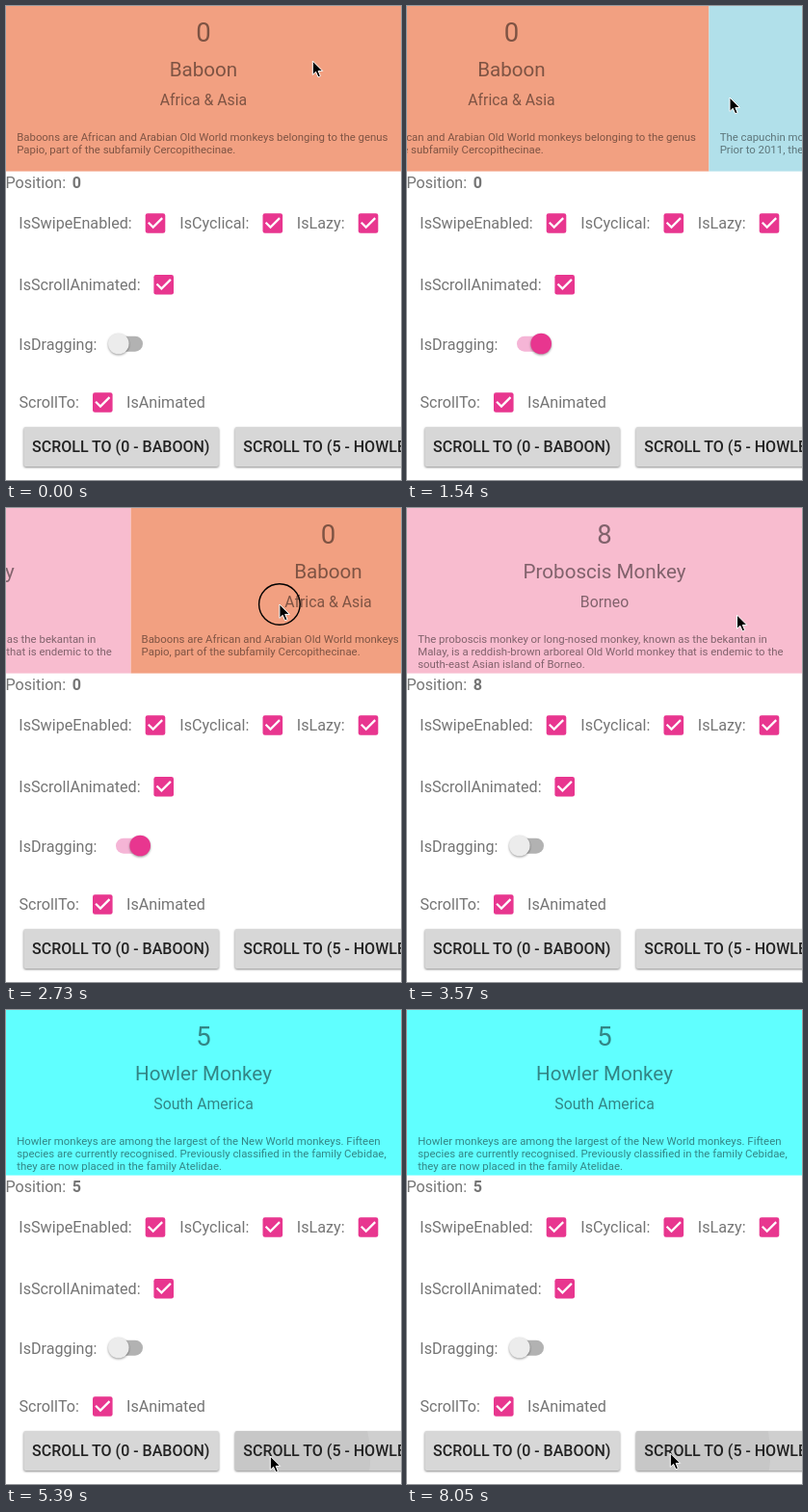
An HTML page that plays this animation: 410x492 px, repeating every 8.19 s.

```html
<!DOCTYPE html>
<html lang="en">
<head>
<meta charset="utf-8">
<title>Carousel demo</title>
<style>
  html, body { margin: 0; width: 100%; height: 100%; overflow: hidden; background: #fff; }
  svg { display: block; font: 16.15px Roboto, sans-serif; fill: #757575; }
  .card text { fill: #000; fill-opacity: .48; }
  .mid { text-anchor: middle; }
  .button text { font-size: 16px; font-weight: 500; fill: #222; }
</style>
</head>
<body>
<svg id="stage" width="410" height="492" viewBox="0 0 410 492"></svg>
<script>
const LOOP = 8190, WIDTH = 410, PINK = '#e8368f';

const cards = {
  0: ['#f2a081', 'Baboon', 'Africa &amp; Asia',
    'Baboons are African and Arabian Old World monkeys belonging to the genus',
    'Papio, part of the subfamily Cercopithecinae.'],
  1: ['#b1e0ea', 'Capuchin Monkey', 'Central &amp; South America',
    'The capuchin monkeys are New World monkeys of the subfamily Cebinae.',
    'Prior to 2011, the subfamily contained only a single genus, Cebus.'],
  5: ['#60ffff', 'Howler Monkey', 'South America',
    'Howler monkeys are among the largest of the New World monkeys. Fifteen',
    'species are currently recognised. Previously classified in the family Cebidae,',
    'they are now placed in the family Atelidae.'],
  8: ['#f8bccf', 'Proboscis Monkey', 'Borneo',
    'The proboscis monkey or long-nosed monkey, known as the bekantan in',
    'Malay, is a reddish-brown arboreal Old World monkey that is endemic to the',
    'south-east Asian island of Borneo.']
};

// dir is the way the cards travel: 1 right, -1 left
const moves = [
  { press: 100, release: 600, end: 760, from: 0, to: 1, dir: -1, drag: true },
  { press: 980, release: 1500, end: 1700, from: 1, to: 0, dir: 1, drag: true },
  { press: 2300, release: 2900, end: 3110, from: 0, to: 8, dir: 1, drag: true },
  { press: 4790, release: 4900, end: 5300, from: 8, to: 5, dir: 1, button: 1, leave: 5640 },
  { press: 6634, release: 6744, end: 7144, from: 5, to: 0, dir: 1, button: 0, leave: 7260 },
  { press: 7510, release: 7620, end: 8020, from: 0, to: 5, dir: -1, button: 1, leave: LOOP }
];

// time, x, y
const pointerPath = [
  [0, 318.3, 57], [200, 318.3, 57], [600, 32.3, 119], [1080, 32.3, 119], [1500, 335, 95],
  [1740, 335, 95], [2260, 154.5, 75], [2430, 154.5, 75], [2920, 346, 112], [3450, 346, 112],
  [3570, 342.5, 111], [3660, 342.5, 111], [3920, 310, 270], [4500, 310, 270], [4760, 274.3, 463],
  [5620, 274.3, 463], [5810, 182, 474], [6180, 182, 474], [6300, 171, 465], [6400, 171, 465],
  [6560, 157.2, 463.5], [7230, 157.2, 463.5], [7490, 273.3, 460], [LOOP, 273.3, 460]
];

const clamp = v => Math.max(0, Math.min(1, v));
const ease = v => (1 - Math.cos(Math.PI * clamp(v))) / 2;

const label = (x, y, text, extra = '') => `<text x="${x}" y="${y}" ${extra}>${text}</text>`;
const size = px => `class="mid" style="font-size:${px}px"`;

const card = ([color, name, place, ...lines], id) => `
  <g class="card" id="card${id}">
    <rect width="${WIDTH}" height="171.6" fill="${color}"/>
    ${label(205, 36.5, id, size(27.5))}
    ${label(205, 73, name, size(20.6))}
    ${label(205, 103, place, size(15.8))}
    ${lines.map((line, i) => label(11.2, 139.8 + 13.3 * i, line, 'style="font-size:11.4px"')).join('')}
  </g>`;

const checkbox = (x, y) => `
  <g transform="translate(${x} ${y})">
    <rect x="-10.3" y="-10.3" width="20.6" height="20.6" rx="2.3" fill="${PINK}"/>
    <path d="M-7.2-.8L-2.3 4.1L7.2-5.4" fill="none" stroke="#fff" stroke-width="2.2"/>
  </g>`;

const button = (x, i, text) => `
  <g class="button">
    <clipPath id="clip${i}"><rect x="${x}" y="437" width="202.5" height="41" rx="2"/></clipPath>
    <rect id="face${i}" x="${x}" y="437" width="202.5" height="41" rx="2" fill="#d7d7d7"/>
    <g clip-path="url(#clip${i})">
      <rect id="shade${i}" x="${x}" y="437" width="202.5" height="41" fill="#000"/>
      <circle id="ripple${i}" fill="#000"/>
    </g>
    ${label(x + 8.7, 463.3, text)}
  </g>`;

document.getElementById('stage').innerHTML = `
  <rect width="410" height="492" fill="#fff"/>
  ${Object.keys(cards).map(id => card(cards[id], id)).join('')}
  ${label(-.6, 189, 'Position:')}
  ${label(68.8, 189, '0', 'id="position" font-weight="700"')}
  ${label(13.3, 231, 'IsSwipeEnabled:')} ${checkbox(155, 225.5)}
  ${label(180.3, 231, 'IsCyclical:')} ${checkbox(276.8, 225.5)}
  ${label(301.8, 231, 'IsLazy:')} ${checkbox(376, 225.5)}
  ${label(13.3, 295, 'IsScrollAnimated:')} ${checkbox(163.7, 289.3)}
  ${label(13.3, 357, 'IsDragging:')}
  <rect id="track" x="114" y="342.7" width="28" height="16" rx="8"/>
  <circle id="thumb" cy="350.5" r="10.8" style="filter:drop-shadow(0 1px 1px #0006)"/>
  ${label(13.5, 417, 'ScrollTo:')} ${checkbox(100.3, 411.5)}
  ${label(125, 417, 'IsAnimated')}
  ${button(18.4, 0, 'SCROLL TO (0 - BABOON)')}
  ${button(237.6, 1, 'SCROLL TO (5 - HOWLER)')}
  <g id="pointer">
    <circle id="touch" r="21.3" fill="none" stroke="#000" stroke-width="1.4"/>
    <path d="M0 0V14.4L3.3 11.3L5.7 16.8L8.1 15.7L5.8 10.4H10.4Z" fill="#000" stroke="#fff"/>
  </g>`;

const set = (id, attrs) => {
  const node = document.getElementById(id);
  for (const key in attrs) node.setAttribute(key, attrs[key]);
};

function pointerAt(t) {
  const i = pointerPath.findIndex(point => point[0] > t);
  const [t0, x0, y0] = pointerPath[i - 1], [t1, x1, y1] = pointerPath[i];
  const k = ease((t - t0) / (t1 - t0));
  return [x0 + (x1 - x0) * k, y0 + (y1 - y0) * k];
}

// Share of the card width travelled: follows the finger, then settles
function progress(move, t) {
  const held = Math.abs(pointerAt(Math.min(t, move.release))[0] - pointerAt(move.press)[0]) / WIDTH;
  return held + (1 - held) * ease((t - move.release) / (move.end - move.release));
}

function drawCards(t) {
  const move = moves.filter(m => m.press <= t).pop() || moves[0];
  const p = t < move.press ? 0 : progress(move, t);
  for (const id in cards) {
    const x = id == move.from ? p * move.dir : id == move.to ? (p - 1) * move.dir : 2;
    set('card' + id, { transform: `translate(${x * WIDTH} 0)` });
  }
  document.getElementById('position').textContent = t < move.release ? move.from : move.to;
}

function drawSwitch(t) {
  let slide = 0, on = false;
  for (const { press, release } of moves.filter(m => m.drag)) {
    const start = press + 130, stop = release + 45;
    slide += ease((t - start) / 250) - ease((t - stop) / 250);
    on = on || (t >= start && t < stop);
  }
  set('track', { fill: on ? '#f5b5d6' : '#b2b2b2' });
  set('thumb', { cx: 116.8 + 22.4 * slide, fill: on ? PINK : '#ececec' });
}

// A pressed button lifts at once, then darkens as the ripple spreads
function drawButtons(t) {
  for (const i of [0, 1]) {
    const move = moves.find(m => m.button === i && t >= m.press && t < m.leave + 150);
    const age = move ? t - move.press : 0;
    const level = move ? clamp(age / 100) * clamp(1 - (t - move.leave) / 150) : 0;
    const spread = clamp(age / 500) ** 3;
    const [cx, cy] = pointerAt(move ? move.press : 0);
    const lift = 1 + level * (1 - spread);
    const opacity = .04 * level * spread;
    set('shade' + i, { opacity });
    set('ripple' + i, { cx, cy, r: 104 * spread, opacity });
    set('face' + i, { style: `filter:drop-shadow(0 ${lift}px ${1.2 * lift}px #0007)` });
  }
}

function drawPointer(t) {
  const touching = moves.some(m => t >= m.press && t < m.release);
  set('pointer', { transform: `translate(${pointerAt(t)})` });
  set('touch', { visibility: touching ? 'visible' : 'hidden' });
}

function frame() {
  const t = performance.now() % LOOP;
  drawCards(t);
  drawSwitch(t);
  drawButtons(t);
  drawPointer(t);
  requestAnimationFrame(frame);
}
frame();
</script>
</body>
</html>
```
